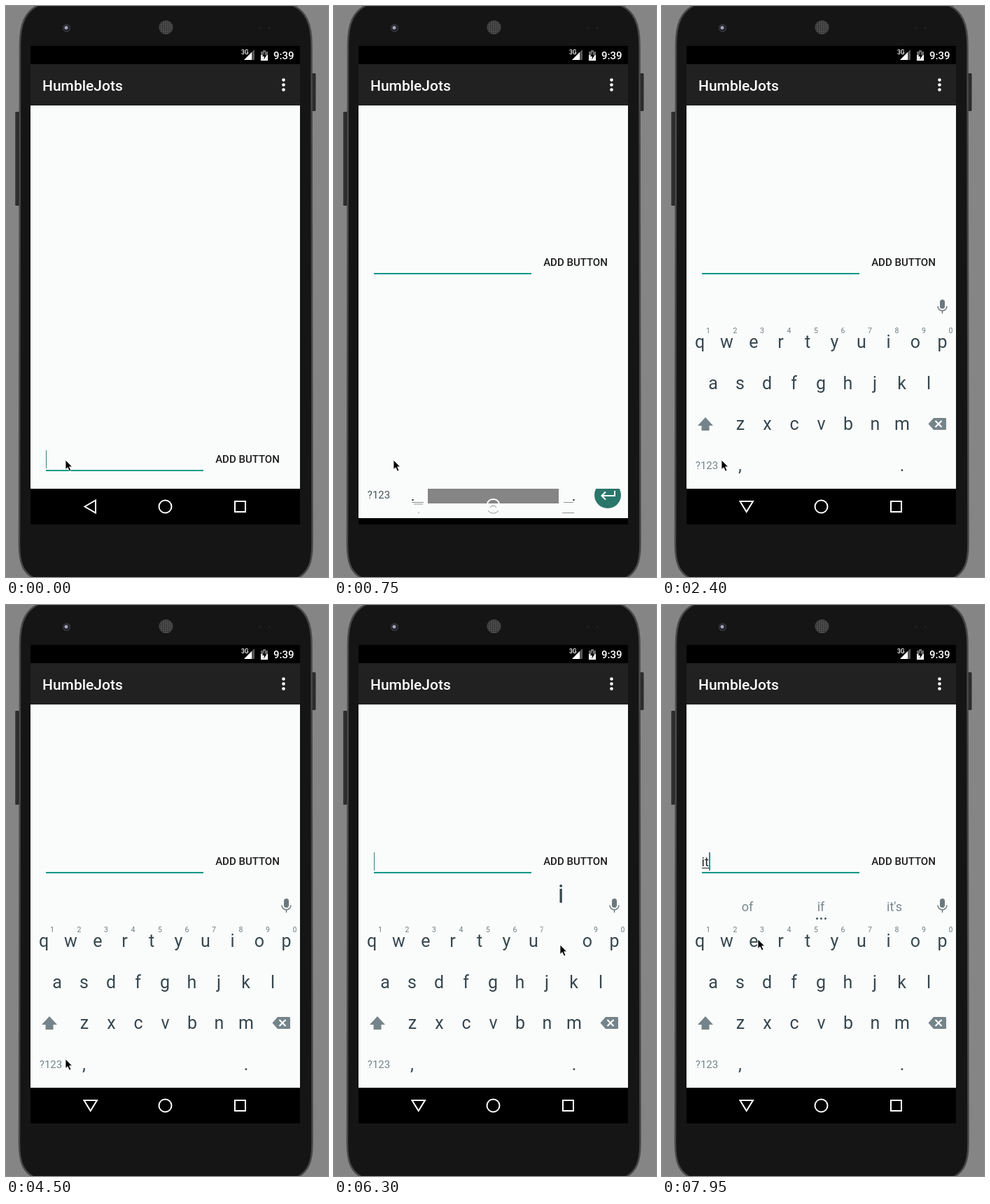
An HTML page for the animation above (8 s loop, 460x815 px).

```html
<!DOCTYPE html>
<html lang="en">
<head>
<meta charset="utf-8">
<title>Todo demo</title>
<style>
  html, body { margin: 0; width: 100%; height: 100%; overflow: hidden; background: #858585; }
  svg { display: block; width: 100%; height: 100%; font-family: Roboto, sans-serif; }
  .line { fill: none; stroke: #fff; stroke-width: 2; }
  .mid { text-anchor: middle; }
  .key { font-size: 25px; fill: #37474f; text-anchor: middle; }
  .hint { font-size: 10.5px; fill: #6f7d83; text-anchor: middle; }
  .word { font-size: 18px; fill: #78878d; text-anchor: middle; }
  .icon { fill: #75848a; }
</style>
</head>
<body>
<svg viewBox="0 0 460 815">
  <defs>
    <pattern id="mesh" width="3" height="3" patternUnits="userSpaceOnUse">
      <rect width="3" height="3" fill="#505050"/>
      <circle cx="1.5" cy="1.5" r="1" fill="#262626"/>
    </pattern>
    <clipPath id="below"><rect x="35" y="689" width="385" height="42"/></clipPath>
  </defs>

  <!-- phone -->
  <rect width="460" height="815" fill="#858585"/>
  <rect x="13" y="151" width="7" height="134" rx="1.5" fill="#2b2b2b"/>
  <rect x="13" y="152" width="1.5" height="132" fill="#404040"/>
  <rect x="436" y="96" width="6.5" height="54" rx="1.5" fill="#2b2b2b"/>
  <path d="M46 -1C28 8 20 24 20 56L19 768C19 795 24 808 40 817H416C432 808 437.500 795 437.500 768L436.500 56C436.500 24 428 8 410 -1Z" fill="#151515" stroke="#484848" stroke-width="2.500"/>
  <circle cx="228.500" cy="30.500" r="10" fill="url(#mesh)"/>
  <circle cx="86.500" cy="31.500" r="5.500" fill="#3c3c42"/>
  <circle cx="86.500" cy="31.500" r="4.300" fill="#1c1c26"/>
  <circle cx="86" cy="31" r="2.500" fill="#a5a5b8"/>
  <g fill="#222"><circle cx="363" cy="31" r="1.500"/><circle cx="376" cy="31" r="1.500"/></g>

  <!-- screen -->
  <rect x="35" y="57" width="385" height="683"/>
  <rect x="35" y="83" width="385" height="59" fill="#212121"/>
  <rect x="35" y="142" width="385" height="547" fill="#fafcfb"/>
  <g fill="#fff">
    <text x="336" y="69" font-size="8.500" font-weight="500">3G</text>
    <path d="M340 77L355 62V77Z" fill="#555"/>
    <path d="M340 77L351 66V77Z"/>
    <path d="M364 65H367V63H371V65H374V78H364Z" fill="#666"/>
    <path d="M364 70H374V78H364Z"/>
    <path d="M370 65L366 72H369L368 77L372.500 70H369.500Z" fill="#000"/>
    <text x="382" y="76" font-size="15" font-weight="500">9:39</text>
    <text x="52" y="121" font-size="21" font-weight="500">HumbleJots</text>
    <circle cx="396.500" cy="105.500" r="2.300"/>
    <circle cx="396.500" cy="112.500" r="2.300"/>
    <circle cx="396.500" cy="119.500" r="2.300"/>
  </g>

  <!-- navigation bar -->
  <g id="nav" class="line">
    <path id="back"/>
    <circle cx="227.500" cy="714.500" r="9"/>
    <rect x="327" y="707" width="15" height="15"/>
  </g>

  <!-- input row -->
  <g id="row">
    <rect x="57" y="662" width="225" height="2" fill="#009888"/>
    <text x="345" y="652" class="mid" font-size="15" font-weight="500" fill="#1c1c1c">ADD BUTTON</text>
    <text id="typed" x="56.500" y="654" font-size="18" fill="#222"></text>
    <rect id="under" x="57" y="656" height="1" fill="#222"/>
    <rect id="caret" y="634" height="26"/>
  </g>

  <!-- keyboard sliding in -->
  <g id="rising" clip-path="url(#below)">
    <rect x="35" y="689" width="385" height="42" fill="#fafcfb"/>
    <rect x="134" y="680" width="187" height="30" fill="#858585"/>
    <text x="64" y="703" class="mid" font-size="15" fill="#455358">?123</text>
    <circle cx="391" cy="698" r="19" fill="#2a766b"/>
    <path class="line" d="M401 692V699H383M388 693.500L382.500 699L388 704.500"/>
    <path class="line" d="M219 710A9 9 0 0 1 236 710"/>
    <g fill="none" stroke="#777" stroke-width=".8">
      <path d="M220 720A9 9 0 0 0 235 720M223 716A5 5 0 0 1 232 716M111 708.500H128M114 711H127M120 723H122M328 708.500H342M326 723.500H343"/>
    </g>
    <g fill="#444"><circle cx="112.500" cy="705" r="1.300"/><circle cx="342.500" cy="705" r="1.300"/></g>
  </g>

  <!-- keyboard -->
  <g id="board">
    <g id="keys"></g>
    <text x="64" y="661" class="mid" font-size="15" fill="#75848a">?123</text>
    <g class="icon">
      <path d="M62 587L73 599H67.500V606H56.500V599H51Z"/>
      <path d="M388 588H404.500Q406 588 406 589.500V603.500Q406 605 404.500 605H388L380.500 596.500Z"/>
      <rect x="397" y="419" width="7" height="13" rx="3.500" fill="#6b797f"/>
    </g>
    <path d="M390.500 592L399.500 601M399.500 592L390.500 601" stroke="#fafcfb" stroke-width="2.200"/>
    <path d="M394 428.500A6.500 6.500 0 0 0 407 428.500M400.500 435V439" fill="none" stroke="#6b797f" stroke-width="1.500"/>
    <g id="hints">
      <text class="word" x="122" y="437"></text>
      <text class="word" x="227" y="437"></text>
      <text class="word" x="332" y="437"></text>
      <g fill="#455358"><circle cx="221.500" cy="447.500" r="1.500"/><circle cx="227.500" cy="447.500" r="1.500"/><circle cx="233.500" cy="447.500" r="1.500"/></g>
    </g>
    <g id="popup">
      <rect x="-25" y="390" width="50" height="115" fill="#fafcfb"/>
      <text class="key" x=".5" y="425" style="font-size:36px"></text>
    </g>
  </g>

  <path id="mouse" d="M0 0V13.500L3.100 10.700L5.500 16L7.900 15L5.600 9.800H9.600Z" stroke="#fff" stroke-width=".8"/>
</svg>
<script>
const $ = id => document.getElementById(id);
const LOOP = 8000, STEP = 150, PITCH = 38.5;
const OPEN = 750, READY = 900, TYPE_I = 6450, TYPE_T = 7500;

// time, x, y
const path = [
  [4800, 85, 648], [5850, 303, 497], [6150, 323, 485], [6450, 323, 485],
  [7200, 211, 480], [7500, 211, 480], [7950, 137, 477]
];

function addText(cls, x, y, str) {
  const el = document.createElementNS('http://www.w3.org/2000/svg', 'text');
  el.setAttribute('class', cls);
  el.setAttribute('x', x);
  el.setAttribute('y', y);
  el.textContent = str;
  $('keys').append(el);
}

function addRow(cls, str, x, y) {
  [...str].forEach((ch, i) => addText(cls, x + i * PITCH, y, ch));
}

addRow('key', 'qwertyuiop', 54, 488);
addRow('key', 'asdfghjkl', 73, 546.5);
addRow('key', 'zxcvbnm', 112, 605);
addRow('hint', '1234567890', 66, 467);
addText('key', 111.5, 664, ',');
addText('key', 343, 664, '.');

const show = (id, on) => { $(id).style.display = on ? '' : 'none'; };

function setAttrs(id, attrs) {
  for (const name in attrs) $(id).setAttribute(name, attrs[name]);
}

function mouseAt(t) {
  const i = path.findIndex(p => p[0] > t);
  if (i === 0) return path[0].slice(1);
  if (i < 0) return path[path.length - 1].slice(1);
  const [t0, x0, y0] = path[i - 1], [t1, x1, y1] = path[i];
  const u = (t - t0) / (t1 - t0), e = u * u * (3 - 2 * u);
  return [x0 + (x1 - x0) * e, y0 + (y1 - y0) * e];
}

function caretOn(t) {
  if (t < OPEN) return t < 450;
  if (t < READY) return false;
  const [start, period] = t < TYPE_I ? [838, 505] : [t < TYPE_T ? TYPE_I : TYPE_T, 500];
  return Math.floor((t - start) / period) % 2 === 0;
}

function draw(t) {
  const text = t < TYPE_I ? '' : t < TYPE_T ? 'i' : 'it';
  const pressed = t >= 6300 && t < TYPE_I ? 'i' : t >= 7350 && t < TYPE_T ? 't' : '';
  const width = [0, 4.5, 10][text.length];
  const rising = t >= OPEN && t < READY;

  show('rising', rising);
  show('nav', !rising);
  show('board', t >= READY);
  setAttrs('back', { d: t < OPEN ? 'M112.5 714.500L128 705.500V723.500Z' : 'M111.500 707H130L120.700 722Z' });
  setAttrs('row', { transform: `translate(0 ${t < OPEN ? 0 : -281})` });

  $('typed').textContent = text;
  setAttrs('under', { width });
  setAttrs('caret', { x: 57 + width, width: text ? 2 : 1, fill: text ? '#009888' : '#3a7f78' });
  show('caret', caretOn(t));

  show('hints', text);
  const words = text === 'it' ? ['of', 'if', "it's"] : ['in', 'I', 'is'];
  document.querySelectorAll('.word').forEach((el, i) => { el.textContent = words[i]; });

  show('popup', pressed);
  setAttrs('popup', { transform: `translate(${54 + PITCH * 'qwertyuiop'.indexOf(pressed || 'q')} 0)` });
  $('popup').lastElementChild.textContent = pressed;

  setAttrs('mouse', { transform: `translate(${mouseAt(t).map(Math.round).join(' ')})` });
}

const origin = performance.now();
function tick() {
  const t = (performance.now() - origin) % LOOP;
  draw(Math.floor(t / STEP) * STEP);
  requestAnimationFrame(tick);
}
tick();
</script>
</body>
</html>
```
